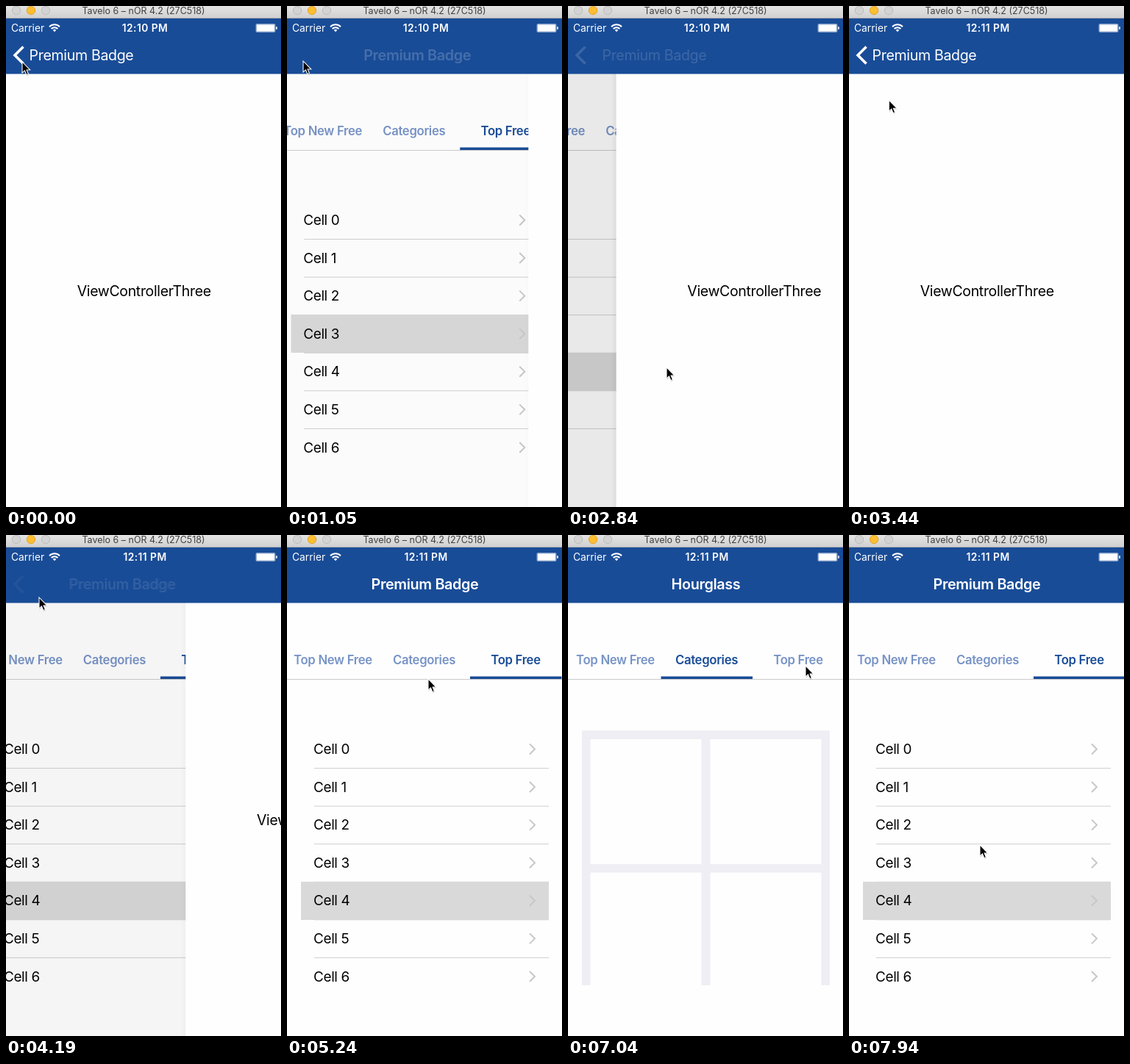
An HTML page for the animation above (8 s loop, 374 px wide and 682 px high).

```html
<!DOCTYPE html>
<html lang="en">
<head>
<meta charset="utf-8">
<title>Navigation demo</title>
<style>
  html, body { margin: 0; width: 100%; height: 100%; overflow: hidden; background: #fefefe; }
  svg { display: block; width: 100%; height: 100%; }
  text { font: 400 19.5px Inter, "Open Sans", sans-serif; letter-spacing: -.018em; }
  .mid { text-anchor: middle; }
  .bar { font-size: 19.6px; fill: #fff; }
  .bold { font-size: 19.8px; font-weight: 600; }
  .cell { font-size: 18.9px; }
  .status { font-size: 13.8px; letter-spacing: 0; fill: #fff; }
  .clock { font-weight: 600; letter-spacing: .45px; }
  .window { font-size: 12.5px; letter-spacing: 0; fill: #404040; }
  .tab { font-size: 16.7px; font-weight: 600; fill: #7793c6; }
  .tab.on { fill: #194c97; }
  .line { fill: none; stroke: #c7c7cc; stroke-width: 2; }
</style>
</head>
<body>
<svg viewBox="0 0 374 682" preserveAspectRatio="none">
  <defs>
    <linearGradient id="chrome" x2="0" y2="1">
      <stop stop-color="#e4e4e4"/><stop offset="1" stop-color="#d0d0d0"/>
    </linearGradient>
    <linearGradient id="fade">
      <stop stop-opacity="0"/><stop offset="1" stop-opacity=".07"/>
    </linearGradient>
    <clipPath id="pane"><rect x="19" y="266" width="337" height="347"/></clipPath>
  </defs>

  <rect width="374" height="682" fill="#fefefe"/>

  <g id="home">
    <g id="strip">
      <text class="tab mid" x="64.5" y="176">Top New Free</text>
      <text class="tab mid" x="188.5" y="176">Categories</text>
      <text class="tab mid" x="313" y="176">Top Free</text>
      <rect id="mark" x="126.5" y="192.5" width="124.5" height="3.5" fill="#194c97"/>
    </g>
    <rect y="196" width="480" height="1" fill="#cbcbcb"/>
    <g clip-path="url(#pane)">
      <g id="grid">
        <rect x="19" y="266" width="337" height="347" fill="#efeef5"/>
        <path fill="#fefefe" d="M30.5 278h151v170h-151zM193.5 278h151v170h-151zM30.5 459.5h151v154h-151zM193.5 459.5h151v154h-151z"/>
      </g>
      <g id="list">
        <g id="rules"></g>
        <rect id="pick" x="19" width="337" height="52" fill="#d9d9d9"/>
        <g id="cells"></g>
      </g>
    </g>
  </g>
  <rect id="dim" width="374" height="682"/>

  <g id="detail">
    <rect id="shade" x="-7" y="92" width="7" height="590" fill="url(#fade)"/>
    <rect y="92" width="374" height="590" fill="#fefefe"/>
    <text class="mid" x="187.7" y="395">ViewControllerThree</text>
  </g>

  <rect y="17" width="374" height="75.5" fill="#194c97"/>
  <polyline id="arrow" points="23.5,55.5 12,67 23.5,78.5" fill="none" stroke="#fff" stroke-width="3.6"/>
  <text id="back" class="bar mid" y="74">Premium Badge</text>
  <text id="head" class="bar bold mid" y="74"></text>

  <text class="status" x="7" y="35">Carrier</text>
  <g fill="none" stroke="#fff" stroke-width="2">
    <path d="M59 28.2a10 10 0 0 1 14 0M61.6 31a6.3 6.3 0 0 1 8.8 0"/>
    <path d="M66 35.2l-2.3-2.4a3.3 3.3 0 0 1 4.6 0z" fill="#fff" stroke="none"/>
  </g>
  <text id="clock" class="status clock mid" x="189" y="35"></text>
  <rect x="339.5" y="24" width="27" height="12" rx="2" fill="#fff" fill-opacity=".5"/>
  <rect x="341" y="25.5" width="24" height="9" fill="#fff"/>
  <rect x="367" y="28" width="2" height="4" rx="1" fill="#fff" fill-opacity=".8"/>

  <rect width="374" height="16.5" fill="url(#chrome)"/>
  <rect y="16" width="374" height="1" fill="#a9a9ad"/>
  <g stroke-width="1">
    <circle cx="14" cy="6" r="5.7" fill="#d3d3d3" stroke="#bcbcbc"/>
    <circle cx="34" cy="6" r="5.7" fill="#fdbe32" stroke="#e2a42a"/>
    <circle cx="54" cy="6" r="5.7" fill="#d3d3d3" stroke="#bcbcbc"/>
  </g>
  <text class="window mid" x="187" y="11">Tavelo 6 – nOR 4.2 (27C518)</text>

  <g id="cursor">
    <g transform="scale(1.05)">
      <path d="M0 0V14.4L3.3 11.4 5.6 16.8 8 15.8 5.8 10.5H10.3Z" transform="translate(.4 1.2)" fill-opacity=".25"/>
      <path d="M0 0V14.4L3.3 11.4 5.6 16.8 8 15.8 5.8 10.5H10.3Z" stroke="#fff"/>
    </g>
  </g>
</svg>

<script>
const LOOP = 8000, PANE = 337, ROW = 51.57;
const $ = id => document.getElementById(id);
const tabs = document.querySelectorAll('.tab');
const clamp = v => Math.min(1, Math.max(0, v));
const smooth = v => (v = clamp(v), v * v * (3 - 2 * v));
const move = (id, x, y = 0) => $(id).setAttribute('transform', `translate(${x} ${y})`);
const fade = (id, v) => $(id).setAttribute('opacity', v);

// time, x, y
const path = [
  [0, 22, 76], [300, 22, 75], [1190, 22, 75], [1790, 148, 368], [2390, 134, 492],
  [2840, 134, 492], [3590, 45, 86], [3740, 45, 85], [4400, 45, 85], [5240, 192, 196],
  [5540, 192, 196], [5990, 148, 388], [7040, 323, 178], [7340, 323, 178], [7940, 178, 422]
];

// start, pushing?
const moves = [[848, false], [2664, true], [4066, false]];
const presses = [[750, 848], [4040, 4066]];

for (let i = 0; i < 7; i++) {
  const y = ROW * i;
  if (i < 6) $('rules').innerHTML += `<rect x="37" y="${317.1 + y}" width="319" height=".85" fill="#c8c8c8"/>`;
  $('cells').innerHTML += `<text class="cell" x="36" y="${298.2 + y}">Cell ${i}</text>
    <polyline class="line" points="330,${284.5 + y} 337,${291.5 + y} 330,${298.5 + y}"/>`;
}

function tick(t) {
  const base = t < 1190 ? 0 : 1190;
  return base + Math.floor((t - base) / 150) * 150;
}

function spring(ms) {
  const w = Math.max(0, ms) * .018;
  return 1 - (1 + w) * Math.exp(-w);
}

function cursorAt(t) {
  let i = 0;
  while (i < path.length - 2 && t >= path[i + 1][0]) i++;
  const [a, x, y] = path[i], [b, u, v] = path[i + 1];
  const k = a === 0 ? 0 : smooth((t - a) / (b - a));
  return [x + (u - x) * k, y + (v - y) * k];
}

// home: 0 = detail on top, 1 = home showing
function navAt(t) {
  let nav = { home: 0, back: 1, head: 0 };
  for (const [start, push] of moves) {
    if (t < start) break;
    const k = spring(t - start), fadeIn = clamp((t - start) / 460) ** 2, fadeOut = (1 - k) ** 3;
    nav = push ? { home: 1 - k, back: fadeIn, head: fadeOut }
               : { home: k, back: fadeOut, head: fadeIn };
  }
  if (presses.some(([a, b]) => t >= a && t < b)) nav.back = .3;
  return nav;
}

function draw(now) {
  const t = tick(now % LOOP);
  const { home, back, head } = navAt(t);

  move('home', -112.5 * (1 - home));
  move('detail', 374 * home);
  fade('dim', .1 * (1 - home));
  fade('shade', 1 - home);
  for (const id of ['back', 'head']) $(id).setAttribute('x', 102.5 + 85 * home);
  fade('back', back);
  fade('arrow', back);
  fade('head', head);

  const out = smooth((t - 5300) / 320), again = smooth((t - 7300) / 320);
  const page = 1 - out + again;
  const onList = t < 5300 || t >= 7300;
  move('strip', -2 * (1 - out));
  move('mark', 124.5 * page);
  move('list', PANE * (1 - page));
  move('grid', -PANE * page);
  tabs.forEach((tab, i) => tab.classList.toggle('on', i === (onList ? 2 : 1)));
  $('head').textContent = onList ? 'Premium Badge' : 'Hourglass';

  $('pick').setAttribute('y', Math.round(265.6 + ROW * (t < 2664 ? 3 : 4)));
  $('clock').textContent = t < 3140 ? '12:10 PM' : '12:11 PM';
  move('cursor', ...cursorAt(t));
}

const begin = performance.now();
function step() {
  draw(performance.now() - begin);
  requestAnimationFrame(step);
}
step();
</script>
</body>
</html>
```
